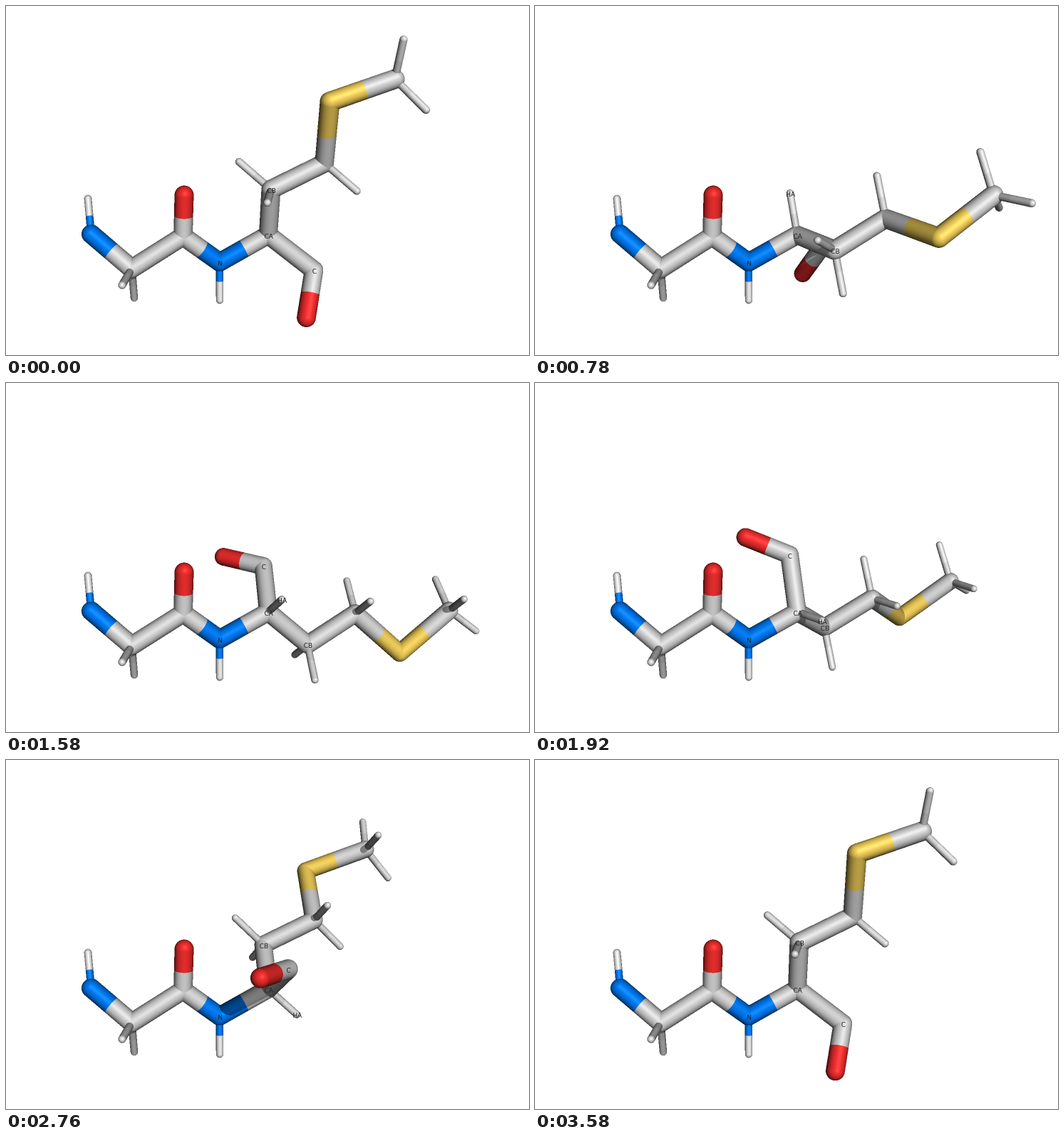
An HTML page with a canvas for the animation above (3.6 s loop, 734x489 px).

```html
<!DOCTYPE html>
<html lang="en">
<head>
<meta charset="utf-8">
<title>Rotating dipeptide</title>
<style>
html, body { margin: 0; width: 100%; height: 100%; overflow: hidden; background: #fff; }
canvas { display: block; }
</style>
</head>
<body>
<canvas id="stage" width="734" height="489"></canvas>
<script>
const W = 734, H = 489, SS = 2, BW = W * SS, BH = H * SS;
const STEP_MS = 20, STEPS = 180;
const EYE = 1386, MID_X = 367, MID_Y = 244.5;
const HEAVY_R = 13, LIGHT_R = 5.2;
const LABEL_LIFT = 78;
const RAD = Math.PI / 180;

const ctx = document.getElementById('stage').getContext('2d');
const buffer = document.createElement('canvas');
buffer.width = BW;
buffer.height = BH;
const bufferCtx = buffer.getContext('2d');
const image = bufferCtx.createImageData(BW, BH);
const pixels = new Uint32Array(image.data.buffer);
const depth = new Float32Array(BW * BH);
const owner = new Int8Array(BW * BH);

const COLORS = {
  C: [220, 220, 220], H: [235, 235, 235], N: [0, 128, 255],
  O: [255, 50, 50], S: [255, 218, 96]
};

// Screen x, screen y, depth
const FIXED = {
  N1: [119.5, 319.5, 30], H1: [115, 270, 20], C1: [176.5, 368, 35],
  H2: [163, 391, 88], H3: [180, 409, -7],
  C2: [248.5, 322.5, 28], O2: [250, 265, 45], HN: [300, 412, 5]
};

// Cylinder coordinates on the turning bond: along, radius, sideways, phase
const TURNING = {
  N: [-78, 0, 0, 0], CA: [0, 0, 0, 0],
  CB: [29, 75, 0, 0], CG: [111, 69.3, 0, 0], SD: [146, 162.3, 0, 0], CE: [240.5, 142, 0, 0],
  HB1: [10.6, 103.8, 48, 0], HB2: [10.6, 103.8, -48, 0],
  HG1: [129, 40.4, 48, 0], HG2: [129, 40.4, -48, 0],
  HE1: [266, 195, 0, 0], HE2: [253.5, 110.8, 48, 0], HE3: [253.5, 110.8, -48, 0],
  C: [30, 75.5, 0, 120], O: [-12, 127.2, 0, 120], HA: [19.6, 56, 0, 240]
};

const BONDS = ('N1-H1 N1-C1 C1-H2 C1-H3 C1-C2 C2-O2 C2-N N-HN N-CA CA-HA CA-C C-O CA-CB ' +
  'CB-HB1 CB-HB2 CB-CG CG-HG1 CG-HG2 CG-SD SD-CE CE-HE1 CE-HE2 CE-HE3')
  .split(' ').map(bond => bond.split('-'));
const LABELS = ['N', 'CA', 'CB', 'C', 'HA'];

const TILT = 6.15 * RAD, SLOPE = 29 * RAD, START_PHASE = -136.4;
const PIVOT = [1, 76.2, 0];
const ACROSS = [Math.sin(SLOPE), Math.cos(SLOPE), 0];
const slanted = (flat, z) => [Math.cos(SLOPE) * flat, -Math.sin(SLOPE) * flat, z];
const AXIS = slanted(Math.cos(TILT), -Math.sin(TILT));
const FRONT = slanted(Math.sin(TILT), Math.cos(TILT));

const dot = (a, b) => a[0] * b[0] + a[1] * b[1] + a[2] * b[2];
const unit = v => { const n = Math.hypot(...v); return v.map(c => c / n); };
const LIGHT = unit([0.4, -0.4, 1]);
const HALF = unit([LIGHT[0], LIGHT[1], LIGHT[2] + 1]);
const SHADOW_U = [Math.SQRT1_2, Math.SQRT1_2, 0];
const SHADOW_V = unit([-LIGHT[2], LIGHT[2], 2 * LIGHT[0]]);

const scaleAt = z => EYE / (EYE - z);
const project = p => {
  const s = scaleAt(p[2]);
  return [MID_X + p[0] * s, MID_Y + p[1] * s, s];
};

function placeAtoms(degrees) {
  const atoms = {};
  for (const [name, [x, y, z]] of Object.entries(FIXED)) {
    const s = scaleAt(z);
    atoms[name] = [(x - MID_X) / s, (y - MID_Y) / s, z];
  }
  for (const [name, [along, radius, side, phase]] of Object.entries(TURNING)) {
    const angle = (degrees + START_PHASE + phase) * RAD;
    const c = Math.cos(angle), s = Math.sin(angle);
    const q = radius * c - side * s, f = -(radius * s + side * c);
    atoms[name] = PIVOT.map((v, i) => v + along * AXIS[i] + q * ACROSS[i] + f * FRONT[i]);
  }
  return atoms;
}

function makeStick(atoms, [from, to]) {
  const a = atoms[from], b = atoms[to];
  const r = from[0] === 'H' || to[0] === 'H' ? LIGHT_R : HEAVY_R;
  const d = b.map((v, i) => v - a[i]);
  const span = axis => {
    const p = dot(a, axis), q = dot(b, axis);
    return [Math.min(p, q) - r, Math.max(p, q) + r];
  };
  return {
    ax: a[0], ay: a[1], az: a[2], bx: b[0], by: b[1], bz: b[2],
    dx: d[0], dy: d[1], dz: d[2], dd: dot(d, d), r2: r * r, r,
    a, b, colors: [COLORS[from[0]], COLORS[to[0]]],
    u: span(SHADOW_U), v: span(SHADOW_V)
  };
}

// Distance along a ray to a round-ended cylinder, or -1
function hit(k, ox, oy, oz, x, y, z) {
  const px = ox - k.ax, py = oy - k.ay, pz = oz - k.az;
  const dr = k.dx * x + k.dy * y + k.dz * z;
  const dp = k.dx * px + k.dy * py + k.dz * pz;
  const rp = x * px + y * py + z * pz;
  const pp = px * px + py * py + pz * pz;
  const a = k.dd - dr * dr;
  const b = k.dd * rp - dp * dr;
  const c = k.dd * pp - dp * dp - k.r2 * k.dd;
  const disc = b * b - a * c;
  if (disc < 0) return -1;
  const t = (-b - Math.sqrt(disc)) / a;
  const along = dp + t * dr;
  if (along > 0 && along < k.dd) return t;
  const first = along <= 0;
  const ex = first ? px : ox - k.bx, ey = first ? py : oy - k.by, ez = first ? pz : oz - k.bz;
  const eb = x * ex + y * ey + z * ez;
  const cap = eb * eb - (ex * ex + ey * ey + ez * ez - k.r2);
  return cap > 0 ? -eb - Math.sqrt(cap) : -1;
}

function trace(sticks) {
  depth.fill(1e9);
  owner.fill(-1);
  sticks.forEach((k, index) => {
    const p = project(k.a), q = project(k.b);
    const pad = k.r * Math.max(p[2], q[2]) + 2;
    const range = (i, limit) => [
      Math.max(0, Math.floor((Math.min(p[i], q[i]) - pad) * SS)),
      Math.min(limit, Math.ceil((Math.max(p[i], q[i]) + pad) * SS))
    ];
    const [x0, x1] = range(0, BW), [y0, y1] = range(1, BH);
    for (let j = y0; j < y1; j++) {
      const vy = (j + 0.5) / SS - MID_Y;
      for (let i = x0; i < x1; i++) {
        const vx = (i + 0.5) / SS - MID_X;
        const n = Math.sqrt(vx * vx + vy * vy + EYE * EYE);
        const t = hit(k, 0, 0, EYE, vx / n, vy / n, -EYE / n);
        const at = j * BW + i;
        if (t > 0 && t < depth[at]) {
          depth[at] = t;
          owner[at] = index;
        }
      }
    }
  });
}

const overlaps = (a, b) => a[0] < b[1] && b[0] < a[1];

function shade(sticks) {
  for (const k of sticks) {
    k.blockers = sticks.filter(o => o !== k && overlaps(o.u, k.u) && overlaps(o.v, k.v));
  }
  const [lx, ly, lz] = LIGHT;
  pixels.fill(0xffffffff);
  for (let at = 0; at < owner.length; at++) {
    if (owner[at] < 0) continue;
    const k = sticks[owner[at]];
    const vx = (at % BW + 0.5) / SS - MID_X;
    const vy = (Math.floor(at / BW) + 0.5) / SS - MID_Y;
    const m = depth[at] / Math.sqrt(vx * vx + vy * vy + EYE * EYE);
    const x = vx * m, y = vy * m, z = EYE - EYE * m;
    const part = ((x - k.ax) * k.dx + (y - k.ay) * k.dy + (z - k.az) * k.dz) / k.dd;
    const f = Math.min(1, Math.max(0, part));
    const nx = (x - k.ax - f * k.dx) / k.r;
    const ny = (y - k.ay - f * k.dy) / k.r;
    const nz = (z - k.az - f * k.dz) / k.r;
    let lit = nx * lx + ny * ly + nz * lz;
    if (lit > 0) {
      for (const o of k.blockers) {
        if (hit(o, x + nx * 0.5, y + ny * 0.5, z + nz * 0.5, lx, ly, lz) > 0) {
          lit = 0;
          break;
        }
      }
    }
    let bright = 0.14 + 0.43 * Math.max(0, nz), gloss = 0;
    if (lit > 0) {
      bright += 0.43 * lit;
      gloss = 26 * Math.pow(Math.max(0, nx * HALF[0] + ny * HALF[1] + nz * HALF[2]), 40);
    }
    const [r, g, b] = k.colors[part < 0.5 ? 0 : 1];
    const tone = c => Math.min(255, c * bright + gloss) | 0;
    pixels[at] = (0xff000000 | tone(b) << 16 | tone(g) << 8 | tone(r)) >>> 0;
  }
}

function surfaceZ(x, y) {
  const i = Math.round(x * SS), j = Math.round(y * SS);
  const n = Math.hypot(x - MID_X, y - MID_Y, EYE);
  return EYE - depth[j * BW + i] * EYE / n;
}

function drawLabels(atoms) {
  ctx.font = '9px "DejaVu Sans", sans-serif';
  ctx.textAlign = 'center';
  ctx.fillStyle = '#222';
  for (const name of LABELS) {
    const [x, y] = project(atoms[name]);
    [...name].forEach((letter, i) => {
      const lx = x + 0.8 + (i - (name.length - 1) / 2) * 6.3, ly = y + 1.5;
      if (surfaceZ(lx, ly) < atoms[name][2] + LABEL_LIFT) ctx.fillText(letter, lx, ly + 3.3);
    });
  }
}

function draw(step) {
  const atoms = placeAtoms(step * 360 / STEPS);
  const sticks = BONDS.map(bond => makeStick(atoms, bond));
  trace(sticks);
  shade(sticks);
  bufferCtx.putImageData(image, 0, 0);
  ctx.drawImage(buffer, 0, 0, W, H);
  drawLabels(atoms);
}

const start = performance.now();
let shown = -1;
function tick() {
  const step = Math.floor((performance.now() - start) / STEP_MS) % STEPS;
  if (step !== shown) draw(shown = step);
  requestAnimationFrame(tick);
}
tick();
</script>
</body>
</html>
```
